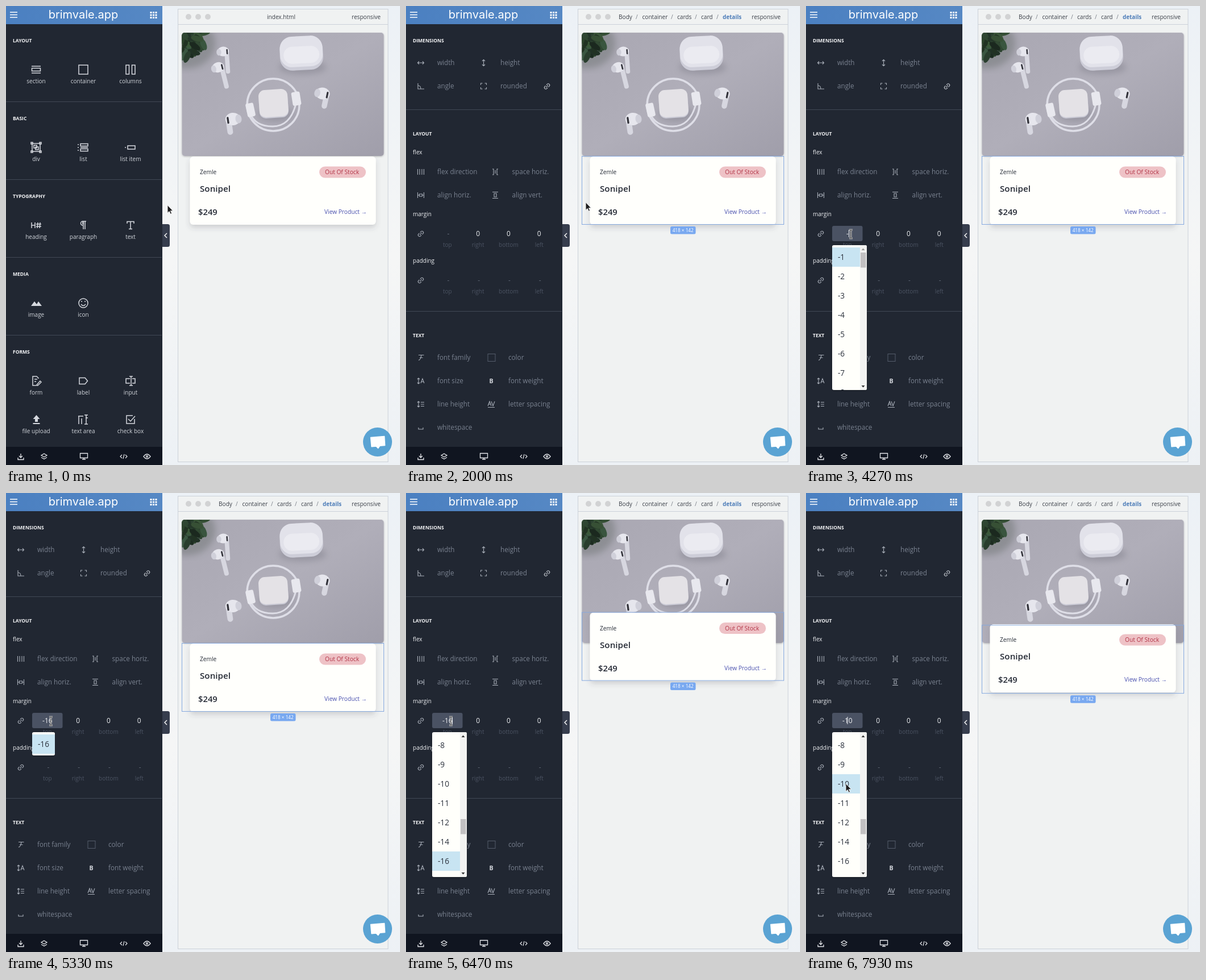
Write an HTML page that moves like this. It is 693 by 808 pixels and loops after 8000 ms.

```html
<!DOCTYPE html>
<html lang="en">
<head>
<meta charset="utf-8">
<title>Page builder</title>
<style>
html, body { margin: 0; width: 100%; height: 100%; overflow: hidden; background: #eef2f6; }
svg { display: block; width: 693px; height: 808px; font-family: "Open Sans", "Noto Sans", sans-serif; }
text { white-space: pre; }
</style>
</head>
<body>
<svg id="stage" viewBox="0 0 693 808"></svg>
<script>
const text = (x, y, s, size = 10, fill = '#cdd1d8', more = '') =>
  `<text x="${x}" y="${y}" font-size="${size}" fill="${fill}" ${more}>${s}</text>`;
const mid = (x, y, s, size, fill, more = '') => text(x, y, s, size, fill, 'text-anchor="middle" ' + more);
const rect = (x, y, w, h, fill, r = 0, more = '') =>
  `<rect x="${x}" y="${y}" width="${w}" height="${h}" rx="${r}" fill="${fill}" ${more}/>`;
const icon = (x, y, d, color = '#d5d8de', w = 1.5) =>
  `<path transform="translate(${x} ${y})" d="${d}" fill="none" stroke="${color}" stroke-width="${w}"/>`;
const link = (x, y, color) => `<g transform="rotate(-45 ${x} ${y})">` +
  icon(x, y, 'M-1-2.500H-3a2.500 2.500 0 0 0 0 5H-1M1-2.500H3a2.500 2.500 0 0 1 0 5H1M-2.500 0h5', color, 1.1) + '</g>';
const line = (y, x1 = 0, x2 = 274, c = '#414855') => `<path d="M${x1} ${y}H${x2}" stroke="${c}"/>`;
const head = (y, s) => text(12, y, s, 8.5, '#f4f5f7', 'font-weight="700"');

// ---- component panel ----
const parts = [
  [112, 'section', 'M-8-6H8M-8 6H8M-7.5-2.5h15v5h-15z'],
  [112, 'container', 'M-8-8H8V8H-8z'],
  [112, 'columns', 'M-8-8h5.5V8H-8zM2.5-8H8V8H2.5z'],
  [249, 'div', 'M-7-7H7V7H-7zM-4-4h5v5h-5zM-1-1h5v5h-5zM-9-9h3v3h-3zM6-9h3v3H6zM-9 6h3v3h-3zM6 6h3v3H6z'],
  [249, 'list', 'M-10-5h2M-10 0h2M-10 5h2M-5-6.500H8v4H-5zM-5 2.500H8v4H-5zM-5 0H8'],
  [249, 'list item', 'M-10 0h2M-5-3H8v6H-5z'],
  [386, 'heading', 'M-8-5V5M-2-5V5M-8 0h6M3-5L2 5M7-5L6 5M0-2h9M0 2h9'],
  [386, 'paragraph', 'M5-7H-1a3 3 0 0 0 0 7M-0-7V7M3-7V7M-2-5h3M-2-3h3'],
  [386, 'text', 'M-6-3v-3.500H6V-3M0-6V6.500M-3 6.500h6'],
  [523, 'image', ''],
  [523, 'icon', 'M8 0a8 8 0 1 1-16 0a8 8 0 1 1 16 0M-4 2q4 5 8 0M-4-3h2M2-3h2'],
  null,
  [660, 'form', 'M4-4v-1L1-8H-6V8H0M-3-3h5M-3 1h3M1 7l6-7 2 2-6 6H1z'],
  [660, 'label', 'M-7-5.500H3L7.500 0 3 5.500H-7z'],
  [660, 'input', 'M-1-4H-8V4h7M3-4h5V4H3M1-8V8M-2-8h6M-2 8h6'],
  [728, 'file upload', ''],
  [728, 'text area', 'M-8 8V-6H0M4-3H8M-3-2v10M5-8V8M2-8h6M2 8h6M-9-6h3'],
  [728, 'check box', 'M7-1V7H-7V-7H4M-4-1L0 3 8-6']
];
const blocks = parts.map((p, i) => p ? icon(53 + i % 3 * 83, p[0], p[2]) +
  mid(53 + i % 3 * 83, p[0] + 24, p[1], 10, '#d0d4da') : '').join('') +
  '<path d="M44 528l6-8 4 5 3-5 6 8zM53.500 720l6 7h-3.500v5h-5v-5h-3.500zM47.500 734h12v2h-12z" fill="#d5d8de"/>' +
  ['LAYOUT', 'BASIC', 'TYPOGRAPHY', 'MEDIA', 'FORMS'].map((s, i) =>
    head(63.500 + 137 * i, s) + (i ? line(31.500 + 137 * i) : '')).join('');

// ---- style panel ----
const dim = '#79818f', soft = '#a9afb9';
const opts = [
  [26, 100, 55, 'width', 'M-5 0H5M-3-2.500L-5.500 0-3 2.500M3-2.500L5.500 0 3 2.500'],
  [136.5, 100, 166, 'height', 'M0-5V5M-2.500-3L0-5.500 2.500-3M-2.500 3L0 5.500 2.500 3'],
  [26, 141, 55, 'angle', 'M-5-5V5H6M-5-1q5 0 5 6'],
  [136.5, 141, 166, 'rounded', 'M-5-2V-5h3M2-5h3v3M5 2v3H2M-2 5h-3V2'],
  [26, 292, 55, 'flex direction', 'M-5.500-5V5M-2-5V5M2-5V5M5.500-5V5'],
  [157, 292, 186.5, 'space horiz.', 'M-5-5h2V5h-2M5-5H3V5h2M0-3V3'],
  [26, 333, 55, 'align horiz.', 'M-5.500-5V5M5.500-5V5M-2.500-2h5v4h-5zM-5-0h2M3 0h2'],
  [157, 333, 186.5, 'align vert.', 'M-5-5.500H5M-5 5.500H5M-2-3h4v6h-4z'],
  [26, 619, 55, 'font family', 'M-4-4.500H5.500M1-4.500Q0 4-4 4.500M-2 0H3.500'],
  [150.5, 619, 180, 'color', ''],
  [26, 660, 55, 'font size', 'M-4-5V5M-6-3l2-2 2 2M-6 3l2 2 2-2M0 4L3-4 6 4M1 1.500h4'],
  [150, 660, 180, 'font weight', ''],
  [26, 701, 55, 'line height', 'M-4-5V5M-6-3l2-2 2 2M-6 3l2 2 2-2M0-3.500h6M0 0h6M0 3.500h6'],
  [150, 701, 180, 'letter spacing', 'M-6 3L-3-5 0 3M-5 0h4M0-5l3 8 3-8M-6 5.500H6'],
  [26, 742, 55, 'whitespace', 'M-4 0v3H4V0']
];
const sides = (y, vals) => link(26, y, soft) + ['top', 'right', 'bottom', 'left'].map((s, i) => {
  const x = 72.800 + 53.800 * i, v = vals[i];
  return (v ? mid(v == '-' ? x + 1.500 : x, y + 4, v, 11.9, v == '-' ? '#5f6775' : '#eceef1') : '') +
    mid(x, y + 23, s, 10, '#4b5362');
}).join('');
const styles = opts.map(([x, y, tx, s, d]) => icon(x, y, d, soft, 1.1) + text(tx, y + 4, s, 11.7, dim)).join('') +
  link(248, 141.5, '#c6cad1') +
  rect(144, 612.5, 13, 13, 'none', 0, 'stroke="#555d6b"') +
  mid(150, 664, 'B', 10.5, '#d5d8de', 'font-weight="700"') +
  head(63.5, 'DIMENSIONS') + line(182.5) + head(227.5, 'LAYOUT') + line(537.5) + head(582.5, 'TEXT') +
  [['flex', 261], ['margin', 370], ['padding', 452]].map(([s, y]) => text(12, y, s, 10, '#eceef1')).join('') +
  sides(401, ['', '0', '0', '0']) + sides(483, ['-', '-', '-', '-']);

// ---- photo ----
// Each bud: a head lying beside the top of its stem.
const bud = (x, y, turn, size, stem, flip = 1) => `<g transform="translate(${x} ${y}) rotate(${turn}) scale(${size * flip} ${size})">
  <path d="M7-2V${stem}" stroke="#d7d7e0" stroke-width="9" stroke-linecap="round"/>
  <ellipse rx="12" ry="10" fill="#e6e6ed"/><ellipse cx="-9" cy="1" rx="5" ry="7" fill="#d0d0da"/>
  <path d="M8-3v8" stroke="#33333b" stroke-width="3" stroke-linecap="round"/></g>`;
let leaves = '', seed = 7;
const rnd = () => (seed = seed * 16807 % 2147483647) / 2147483647;
for (let i = 0; i < 40; i++) {
  const a = rnd() * 1.57, r = rnd() * 44;
  leaves += `<ellipse transform="translate(${309 + r * Math.cos(a)} ${47 + r * Math.sin(a)}) rotate(${a * 57 + rnd() * 80 - 40})" rx="11" ry="5" fill="hsl(${115 + rnd() * 25} 20% ${13 + rnd() * 17}%)"/>`;
}
const photo = `<g filter="url(#drop)">${rect(309.5, 47, 355, 217, 'url(#wall)', 5)}</g>
  <g clip-path="url(#frame)">
  <ellipse cx="318" cy="66" rx="50" ry="44" fill="#6f7475" opacity=".5" filter="url(#blur)"/>${leaves}
  <g filter="url(#blur)" opacity=".3"><ellipse cx="522" cy="108" rx="42" ry="12" fill="#60606c"/><ellipse cx="474" cy="190" rx="30" ry="12" fill="#60606c"/></g>
  <g transform="rotate(-3 519 83)">${rect(481.5, 54, 76, 59, '#cdcdd8', 22)}${rect(482, 53, 75, 54, '#e2e2ea', 21)}${rect(488, 71, 63, 30, '#ebebf1', 15)}</g>
  ${bud(382, 80, -4, 0.85, 42)}${bud(373, 108, -14, 0.9, 40)}
  ${bud(557, 154, 12, 1.05, 20)}${bud(399, 199, -8, 1.1, 20, -1)}
  <g fill="none" stroke="#dedee7" stroke-width="3.500"><circle cx="470" cy="174" r="46"/><path d="M429 188q9 24 40 24t41-40" stroke-width="3"/></g>
  <g transform="rotate(-4 470 172)">${rect(445, 149, 51, 48, '#cacad5', 11)}${rect(445, 147, 51, 48, '#e4e2e6', 11)}</g>
  <g transform="rotate(-12 430 183)">${rect(423, 171, 14, 24, '#e8e8ee', 3)}</g>
  <g transform="rotate(-9 511 163)">${rect(503, 151, 15, 24, '#e8e8ee', 3)}</g></g>`;

const ink = '#252a35';
const card = `<g filter="url(#shade)">${rect(323.5, 265, 327, 120, '#fffffc', 6)}</g>` +
  text(341, 296, 'Zemle', 10.2, ink) + text(341, 327, 'Sonipel', 15.2, ink, 'font-weight="600"') +
  text(338, 368, '$249', 14.8, ink, 'font-weight="600"') +
  rect(551, 282.5, 82, 20, '#eec2c6', 10) + mid(591, 296, 'Out Of Stock', 10.2, '#b23345') +
  text(560, 366, 'View Product →', 10.2, '#484fae');

const crumbs = [[374, 'Body'], [404, '/'], [415.5, 'container'], [466, '/'], [477, 'cards'], [508, '/'], [519, 'card'], [546, '/']]
  .map(([x, s]) => text(x, 23, s, 10.1, s == '/' ? '#7a7f88' : '#3b4049')).join('') +
  text(557, 23, 'details', 9.8, '#4c7cb8', 'font-weight="700"');

const gridDots = [0, 1, 2].flatMap(i => [0, 1, 2].map(j => rect(253.5 + 4.5 * i, 10 + 4.5 * j, 3, 3, '#fff'))).join('');

document.getElementById('stage').innerHTML = `<defs>
  <linearGradient id="wall" x2="1" y2="1"><stop stop-color="#a9a7b2"/><stop offset=".5" stop-color="#b0aeb9"/><stop offset="1" stop-color="#a09eaa"/></linearGradient>
  <linearGradient id="page" x2="0" y2="1"><stop stop-color="#ecf1f6"/><stop offset=".55" stop-color="#f5f6f6"/><stop offset="1" stop-color="#edf1f5"/></linearGradient>
  <linearGradient id="bar"><stop stop-color="#4b80c1"/><stop offset="1" stop-color="#5688c4"/></linearGradient>
  <clipPath id="frame">${rect(309.5, 47, 355, 217, '#000', 5)}</clipPath>
  <filter id="blur"><feGaussianBlur stdDeviation="6"/></filter>
  <filter id="drop"><feDropShadow dx="0" dy="1" stdDeviation="1.500" flood-opacity=".25"/></filter>
  <filter id="shade" x="-10%" y="-20%" width="120%" height="150%"><feDropShadow dx="0" dy="5" stdDeviation="5" flood-color="#404050" flood-opacity=".2"/></filter></defs>
  ${rect(275, 0, 418, 808, 'url(#page)')}
  ${rect(302.5, 5.5, 369.5, 797, '#f0f2f2', 0, 'stroke="#cbd1d9"')}${line(32.5, 302, 672, '#cbd1d9')}
  ${[321, 338, 355].map(x => `<circle cx="${x}" cy="19" r="5" fill="#d2d3d4"/>`).join('')}
  ${text(608, 23, 'responsive', 10.1, '#3b4049')}
  <g id="file">${mid(484, 23, 'index.html', 10.1, '#3b4049')}</g><g id="crumbs">${crumbs}</g>
  ${photo}<g id="card">${card}</g><g id="outline"></g>
  <circle cx="653.500" cy="767.500" r="25.500" fill="#5aa3d3"/>
  <path d="M641.500 759.500l24-2 1 16-9 .800-3 4.200-3.500-3.500-8 .700z" fill="#fff" stroke="#fff" stroke-width="1.500" stroke-linejoin="round"/>
  ${rect(0, 0, 275, 808, '#212732')}<g id="blocks">${blocks}</g><g id="styles">${styles}</g>
  ${rect(0, 0, 275, 32, 'url(#bar)')}${icon(13.5, 15.5, 'M-6.500-4.500h13M-6.500 0h13M-6.500 4.500h13', '#fff', 1.6)}${gridDots}
  ${mid(136, 22, 'brimvale.app', 20, '#fff', 'font-family="Inter, sans-serif"')}
  ${rect(0, 776, 275, 32, '#101520')}
  ${icon(26, 793, 'M0-5V2M-3-1l3 3 3-3M-5 2v3.500H5V2', '#e3e5e9', 1.3)}
  ${icon(67, 793, 'M0-5l5 3-5 3-5-3zM-5 1.500l5 3 5-3', '#e3e5e9', 1.3)}
  ${icon(137, 792, 'M-6.500-4.500h13v8h-13zM-3 6H3M0 3.500V6', '#e3e5e9', 1.3)}
  ${icon(207, 793, 'M-3-3l-3 3 3 3M3-3l3 3-3 3M1-4L-1 4', '#e3e5e9', 1.2)}
  ${icon(248, 793, 'M-6 0q6-8 12 0q-6 8-12 0zM1.500 0a1.500 1.500 0 1 1-3 0a1.500 1.500 0 1 1 3 0', '#e3e5e9', 1.3)}
  <path d="M275 384h9.500q3.500 0 3.500 3.500v33q0 3.500-3.500 3.500h-9.500z" fill="#363d4d"/>${icon(281, 404, 'M2-4l-4 4 4 4', '#fff', 1.4)}
  <g id="top"></g>`;

// ---- motion, counted in ticks of 1/15 s ----
const TICK = 1000 / 15;
const $ = id => document.getElementById(id);
const last = (list, n) => list.filter(s => s[0] <= n).pop();
const path = [[0, 284, 351], [5, 284, 351], [11, 336, 350], [14, 336, 350], [20, 316, 346], [38, 316, 346], [44, 126, 399],
  [45, 126, 399], [49, 79, 401], [107, 79, 401], [108, 75, 438], [114, 75, 438], [115, 74, 465], [119, 70, 512], [120, 70, 512]];
const moves = [[0, 0, 0], [82, 0, 16], [108, 16, 8], [115, 8, 9], [119, 9, 10]];
const values = [[0, ''], [64, '-'], [67, '-1'], [71, '-16'], [108, '-8'], [115, '-9'], [119, '-10']];
const carets = [[0, 0], [52, 73], [61, 0], [64, 75.5], [67, 78], [71, 81.5], [80, 0], [97, 81.5], [104, 0], [119, 73]];
const negs = [1, 2, 3, 4, 5, 6, 7, 8].map(v => -v);
const tail = [-8, -9, -10, -11, -12, -14, -16];
// start, items, highlighted row, list top, scroll thumb top
const lists = [[0], [52, [0, 1, 2, 3, 4, 5, 6, 7], 0, 425, 434], [64, negs, 0, 425, 434],
  [67, [-1, -10, -11, -12, -14, -16, '-1/2'], 0, 425], [71, [-16], 0, 425], [82],
  [95, tail, 6, 427, 574], [108, tail, 0, 427, 574], [115, tail, 1, 427, 574], [119, tail, 2, 427, 574]];

const arrow = '<path d="M0-.500v14l3.200-3 2.100 4.800 2.300-1-2.100-4.600h4.300z" fill="#1c1c1e" stroke="#fff" stroke-width=".9"/>';
const beamPath = 'M-3-7h2l1 1 1-1h2M0-6V7M-3 8h2l1-1 1 1h2';
const beam = icon(0, 0, beamPath, '#fff', 2.6) + icon(0, 0, beamPath, '#222', 1.1);

function pointer(n) {
  const i = path.findIndex(p => p[0] > n), [a, x, y] = path[i - 1], [b, u, v] = path[i];
  const k = (n - a) / (b - a), e = k * k * (3 - 2 * k);
  return [x + (u - x) * e, y + (v - y) * e];
}

function popup([, items, hi, y0, thumb]) {
  if (!items) return '';
  const w = thumb ? 61 : 40, h = thumb ? 255 : items.length * 34 + 7;
  const rows = items.map((s, i) => (i == hi ? rect(46, y0 + 34 * i, thumb ? 49 : w, 34, '#c8e4f2') : '') +
    text(56, y0 + 21.5 + 34 * i, s, 13.6, '#2a303b')).join('');
  const bar = thumb ? rect(95, 421, 12, 255, '#f2f2f1') + rect(96, thumb, 9.5, 26.5, '#c2c0c2') +
    `<path d="M97.500 430h6l-3-3.500z" fill="${thumb < 440 ? '#999' : '#333'}"/><path d="M97.500 668h6l-3 3.500z" fill="#333"/>` : '';
  return `<clipPath id="pop">${rect(46, 421, w, h, '#000', 3)}</clipPath>
    <g filter="url(#drop)">${rect(46, 421, w, h, '#fffffb', 3)}</g><g clip-path="url(#pop)">${rows}${bar}</g>`;
}

function field(n) {
  const v = last(values, n)[1], caret = last(carets, n)[1];
  const clamp = k => Math.max(0, Math.min(1, k));
  const fill = n < 82 ? clamp((n - 51) / 5) : n < 95 ? clamp((86 - n) / 5) : clamp((n - 94) / 3);
  const edge = x => rect(x, 387.5, 53, 26.5, 'none', 3, 'stroke="#5d6573"');
  return (n >= 43 && n < 48 ? edge(99.5) : '') + (n >= 48 ? rect(46, 387, 53.5, 27, '#4a5263', 3, `opacity="${fill}"`) : '') +
    (n >= 48 && fill < 1 ? edge(46.5) : '') +
    (v ? mid(72.8, 405, v, 11.9, '#f0f2f4') : mid(74.3, 405, '-', 11.9, '#6b7280')) +
    (caret ? rect(caret - 0.5, 394, 1, 13, '#eef0f3') : '');
}

function draw(n) {
  const [x, y] = pointer(n), chosen = n >= 30;
  for (const id of ['styles', 'crumbs']) $(id).style.display = chosen ? '' : 'none';
  for (const id of ['blocks', 'file']) $(id).style.display = chosen ? 'none' : '';

  // the card jumps to its new margin, the outline eases after it
  const [start, from, to] = last(moves, n);
  const k = Math.min(1, (n - start + 1) / 6);
  const lag = from + (to - from) * (1 - (1 - k) ** 2.5);
  $('card').setAttribute('transform', `translate(0 ${-3.4 * to})`);
  $('outline').setAttribute('transform', `translate(0 ${-3.4 * lag})`);
  const inner = !chosen && x > 324;
  $('outline').innerHTML = chosen || x > 309 ?
    rect(inner ? 323.5 : 309.5, 264.5, inner ? 327 : 355, 120, 'none', 0, 'stroke="#86a9df"') +
    rect(465, 388, 44.5, 13.5, '#78a8f0', 2.5) + mid(487.2, 397.7, inner ? '384 × 142' : '418 × 142', 8.2, '#fff') : '';

  const typing = n >= 54 && n < 84 || n >= 96 && n < 108;
  $('top').innerHTML = (chosen ? field(n) : '') + (n >= 43 && n < 55 ? rect(267.5, 34, 4.5, 325, '#4b5261', 2) : '') +
    popup(last(lists, n)) + `<g transform="translate(${x} ${y})">${typing ? beam : arrow}</g>`;
}

let shown = -1;
function loop() {
  // small bias absorbs rounding at tick edges
  const n = Math.floor(performance.now() % 8000 / TICK + 0.1) % 120;
  if (n !== shown) draw(shown = n);
  requestAnimationFrame(loop);
}
loop();
</script>
</body>
</html>
```
